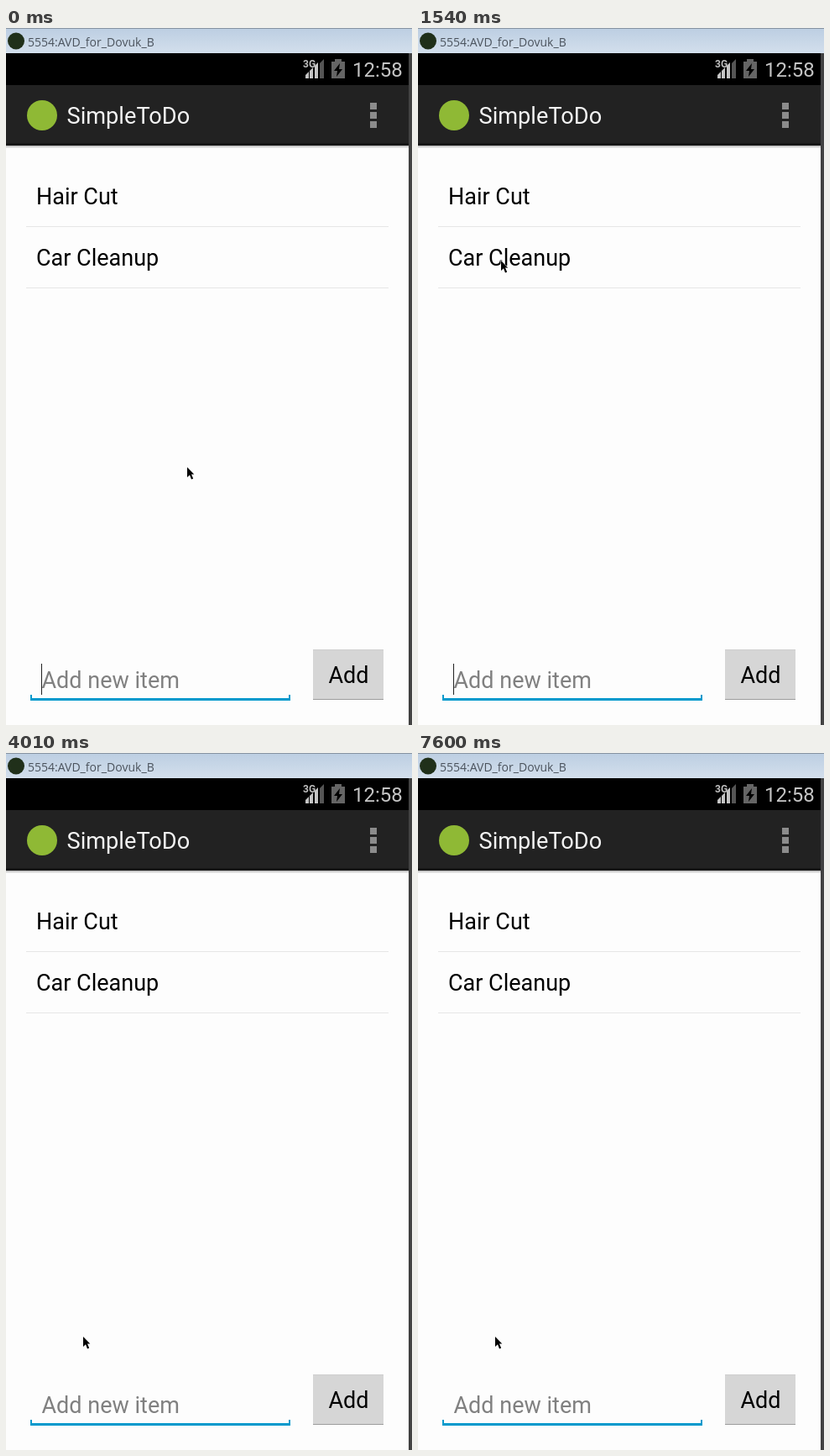
An HTML page that plays this animation: 484 by 830 pixels, repeating every 8000 ms.

```html
<!DOCTYPE html>
<html lang="en">
<head>
<meta charset="utf-8">
<title>To-do list</title>
<style>
  html, body { margin: 0; width: 100%; height: 100%; overflow: hidden; background: #fdfdfd; }
  svg { display: block; width: 484px; height: 830px; font: 27px Roboto, sans-serif; }
  rect { shape-rendering: crispEdges; }
</style>
</head>
<body>
<svg viewBox="0 0 484 830">
  <defs>
    <linearGradient id="glass" x1="0" y1="0" x2="0" y2="1">
      <stop offset="0" stop-color="#bccee2"/>
      <stop offset="1" stop-color="#d3dfec"/>
    </linearGradient>
    <linearGradient id="shadow" x1="0" y1="0" x2="0" y2="1">
      <stop offset="0" stop-color="#b4b4b4"/>
      <stop offset="1" stop-color="#f4f4f4"/>
    </linearGradient>
  </defs>
  <rect width="484" height="830" fill="#fdfdfd"/>

  <!-- Window title -->
  <rect width="484" height="30" fill="url(#glass)"/>
  <rect width="484" height="1" fill="#8793a1"/>
  <circle cx="12" cy="15.5" r="10" fill="#20301a"/>
  <text x="26" y="22" font-size="14" font-family="Open Sans, sans-serif" fill="#4b535d">5554:AVD_for_Dovuk_B</text>

  <!-- Status bar -->
  <rect y="30" width="480" height="38"/>
  <text x="354" y="47" font-size="12" font-weight="bold" fill="#bebebe">3G</text>
  <path d="M357 60V56l4-4v8zM362 60V51l4-4v13zM368 60V45l4-4v19z" fill="#c4c4c4"/>
  <path d="M374 60V42l5-5v23z" fill="#555"/>
  <path d="M392 37h8v3h4v20h-16V40h4z" fill="#656565"/>
  <path d="M398 42l-7 9h4l-1 7 7-9h-4z"/>
  <text x="413" y="58" font-size="24" fill="#c4c4c4">12:58</text>

  <!-- Action bar -->
  <rect y="68" width="480" height="72" fill="#222"/>
  <rect y="137" width="480" height="3" fill="#161616"/>
  <rect y="140" width="480" height="3" fill="url(#shadow)"/>
  <circle cx="43" cy="104" r="18" fill="#8fb935"/>
  <text x="72.5" y="114" font-size="27.2" fill="#f3f3f3">SimpleToDo</text>
  <path d="M434 89h8v8h-8zM434 100h8v8h-8zM434 111h8v8h-8z" fill="#8c8c8c"/>

  <!-- List -->
  <text x="36" y="210">Hair Cut</text>
  <rect x="24" y="236" width="432" height="1" fill="#e6e6e6"/>
  <text x="36" y="283">Car Cleanup</text>
  <rect x="24" y="309" width="432" height="1" fill="#e6e6e6"/>

  <!-- Entry field and button -->
  <text x="42.5" y="786" fill="#808080">Add new item</text>
  <path d="M29 794h2v4h306v-4h2v7H29z" fill="#0099cc" shape-rendering="crispEdges"/>
  <rect id="caret" x="42" y="757" width="1" height="37" fill="#222"/>
  <rect x="366" y="740" width="84" height="60" fill="#cecece"/>
  <rect x="366" y="741" width="84" height="58" fill="#d6d6d6"/>
  <rect x="366" y="799" width="84" height="1" fill="#9c9c9c"/>
  <text x="384.5" y="780">Add</text>

  <rect x="480" y="30" width="4" height="800" fill="#424242"/>
  <path id="pointer" d="M0 0V12L3 9.3 5 14.5 7.2 13.6 5 8.5H8.3Z" stroke="#fff" paint-order="stroke"/>
</svg>
<script>
  const LOOP = 8000;
  const TICK = 127;          // the pointer is redrawn once per tick
  const BLINK = 500;         // time between caret flips
  const FIRST_FLIP = 10;
  const SKIPPED_FLIP = 10;   // the caret stays lit through this beat

  // Ends of the pointer's strokes: tick, x, y.
  const strokes = [
    [0, 216, 523], [2, 206, 655], [5, 160, 690], [6, 136, 543], [7, 83, 365],
    [12, 99, 277], [19, 99, 277], [20, 113, 351], [22, 123, 341], [24, 92, 695]
  ];
  const pointer = document.getElementById("pointer");
  const caret = document.getElementById("caret");

  const easeOut = p => 1 - (1 - p) ** 2;

  function pointerAt(tick) {
    const next = strokes.findIndex(([end]) => end > tick);
    if (next < 0) return strokes.at(-1).slice(1);
    const [start, x0, y0] = strokes[next - 1];
    const [end, x1, y1] = strokes[next];
    const p = easeOut((tick - start) / (end - start));
    return [x0 + (x1 - x0) * p, y0 + (y1 - y0) * p].map(Math.round);
  }

  function caretVisible(t) {
    const beat = Math.floor((t - FIRST_FLIP) / BLINK);
    const flips = beat < SKIPPED_FLIP ? beat : beat - 1;
    return flips % 2 !== 0;
  }

  function draw(t) {
    pointer.setAttribute("transform", `translate(${pointerAt(Math.floor(t / TICK))})`);
    caret.setAttribute("visibility", caretVisible(t) ? "visible" : "hidden");
  }

  const begin = performance.now();
  function tick() {
    draw((performance.now() - begin) % LOOP);
    requestAnimationFrame(tick);
  }
  tick();
</script>
</body>
</html>
```
